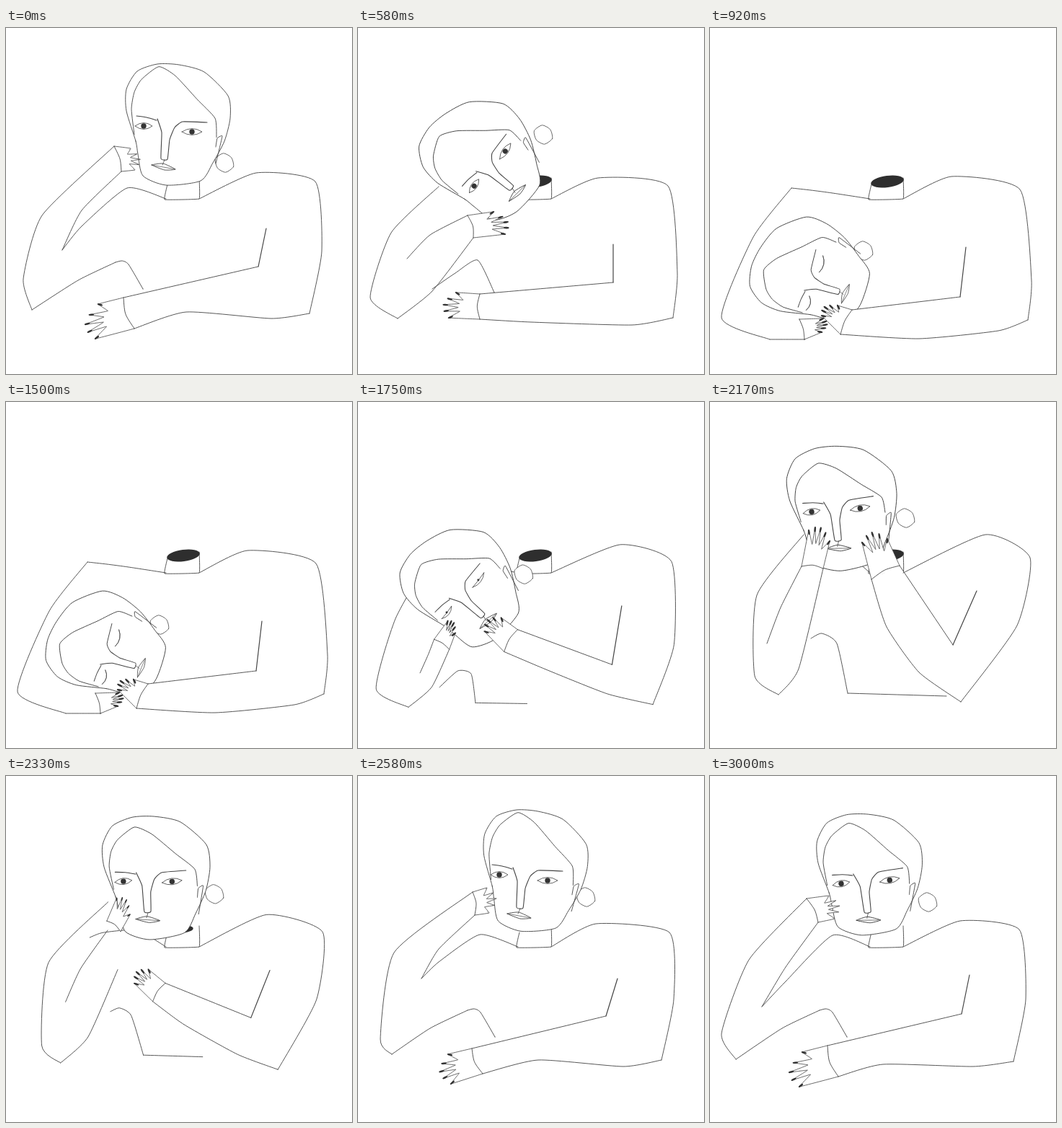
An HTML page with a canvas that plays this animation: 480x480 px, repeating every 3.08 s.

```html
<!DOCTYPE html>
<html lang="en">
<head>
<meta charset="utf-8">
<title>Resting on the elbows</title>
<style>
html, body { margin: 0; height: 100%; overflow: hidden; background: #fff; }
canvas { display: block; width: 100vw; height: 100vh; }
</style>
</head>
<body>
<canvas id="stage" width="480" height="480"></canvas>
<script>
// skull and face: x, y, degrees, scale. look: eyes open, neck open, hairline drop.
// Limbs: a few joints as x, y pairs. Hands: both cuff ends, then first and last fingertip.
const upright = {
  skull: [240, 135, 0, 1], face: [222, 160, 0, 1], bun: [303, 187], look: [1, 0, 0.02],
  side: [347, 201, 429, 213, 438, 310, 421, 396],
  under: [368, 403, 250, 394], elbow: [350, 331, 361, 278],
  handR: [163, 374, 178, 417, 128, 383, 124, 431],
  outer: [150, 164, 50, 260, 24, 348, 36, 391],
  inner: [100, 350, 152, 325], crease: [160, 199, 105, 253, 78, 308],
  torso: [168, 222, 105, 275, 78, 308],
  handL: [150, 164, 160, 199, 173, 167, 179, 197],
  hill: [152, 325, 161, 323, 170, 328, 190, 362], base: [190, 362]
};
const drooping = {
  skull: [178, 181, -42, 1], face: [197, 208, -55, 0.96], bun: [257, 148], look: [1, 1, 0.2],
  side: [333, 208, 430, 219, 443, 340, 437, 402],
  under: [380, 412, 240, 408], elbow: [354, 353, 354, 300],
  handR: [169, 369, 169, 404, 136, 367, 126, 402],
  outer: [112, 220, 46, 284, 17, 374, 55, 403],
  inner: [103, 365, 160, 291], crease: [152, 260, 100, 287, 68, 320],
  torso: [165, 225, 145, 222, 140, 222],
  handL: [152, 260, 160, 291, 188, 255, 204, 286],
  hill: [103, 362, 135, 340, 166, 322, 189, 367], base: [189, 367]
};
const asleep = {
  skull: [143, 337, -66, 0.95], face: [161, 360, -78, 0.85], bun: [213, 309], look: [0, 1, 0.2],
  side: [335, 206, 430, 224, 446, 350, 441, 405],
  under: [400, 420, 290, 431], elbow: [347, 373, 355, 304],
  handR: [197, 391, 181, 425, 177, 385, 155, 399],
  outer: [113, 222, 60, 290, 16, 402, 83, 432],
  inner: [107, 432, 131, 432], crease: [124, 404, 124, 404, 124, 404],
  torso: [170, 229, 140, 225, 113, 222],
  handL: [124, 404, 131, 432, 157, 403, 155, 422],
  hill: [131, 432, 131, 432, 131, 432, 131, 432], base: [131, 432]
};
const rising = {
  skull: [156, 186, -20, 1.02], face: [156, 217, -31, 1], bun: [244, 180], look: [0.8, 1, 0.25],
  side: [388, 191, 439, 219, 432, 325, 382, 432],
  under: [300, 392, 240, 322], elbow: [357, 357, 375, 265],
  handR: [242, 252, 221, 280, 217, 227, 193, 250],
  outer: [92, 205, 45, 310, 33, 395, 59, 416],
  inner: [98, 365, 123, 268], crease: [90, 266, 75, 305, 54, 352],
  torso: [170, 225, 140, 215, 110, 208],
  handL: [90, 266, 123, 268, 97, 220, 118, 235],
  hill: [98, 365, 145, 323, 179, 331, 190, 405], base: [322, 407]
};
const cupped = {
  skull: [188, 147, -8, 1.03], face: [176, 170, -11, 1], bun: [271, 161], look: [1, 1, 0.22],
  side: [382, 184, 444, 216, 426, 310, 348, 416],
  under: [290, 375, 245, 312], elbow: [337, 337, 370, 262],
  handR: [263, 227, 224, 246, 246, 190, 211, 195],
  outer: [130, 184, 65, 268, 62, 380, 95, 406],
  inner: [123, 370, 157, 231], crease: [127, 228, 98, 285, 79, 335],
  torso: [190, 210, 150, 190, 135, 186],
  handL: [127, 228, 157, 231, 137, 178, 166, 193],
  hill: [140, 328, 155, 321, 176, 335, 191, 404], base: [328, 408]
};
const leaning = {
  ...upright,
  skull: [247, 133, 2, 1], face: [227, 161, 0, 1], bun: [316, 168],
  side: [330, 205, 432, 217, 438, 310, 421, 394], elbow: [344, 333, 360, 281],
  handR: [158, 378, 173, 413, 125, 386, 129, 427],
  outer: [159, 161, 50, 245, 31, 365, 47, 386],
  crease: [162, 193, 112, 240, 88, 281], torso: [169, 220, 112, 258, 88, 281],
  handL: [159, 161, 162, 193, 179, 155, 182, 190]
};
const settled = {
  ...upright,
  skull: [224, 137, -3, 1], face: [217, 167, -11, 1], bun: [302, 175], look: [1, 0, 0.12],
  under: [365, 403, 240, 400], elbow: [349, 330, 360, 276],
  outer: [134, 170, 54, 255, 16, 357, 36, 393],
  crease: [150, 203, 105, 265, 72, 320], torso: [170, 221, 105, 285, 72, 320],
  handL: [134, 170, 150, 203, 165, 166, 173, 198]
};

// [tick, pose, easing power on the way in: >1 speeds up, <0 slows down]
const keys = [
  [0, upright, 1], [4, upright, 1], [7, drooping, 1.4], [11, asleep, -1.3],
  [18, asleep, 1], [23, rising, 1.2], [26, cupped, 1], [31, leaning, 1],
  [36, settled, 1], [37, upright, 1]
];
const LOOP = 3080, RATE = 12 / 1000, INK = '#444';
const NECK = [222, 237], NAPE = [268, 237];

// Shapes of the head, around the middle of the skull and of the face.
const SKULL = pairs([-60, 22, -73, -20, -73, -50, -58, -75, -30, -85, 0, -84, 35, -74, 68, -41,
  71, -10, 63, 22, 47, 52, 30, 77, -18, 83, -50, 70, -57, 40]);
const HAIR = pairs([-62, 13, -66, -23, -62, -47, -52, -65, -28, -83, -5, -70, 25, -37, 50, -10, 52, 17]);
const EAR = pairs([51, 30, 53, 18, 60, 15, 51, 53]);
const NOSE = pairs([-12, -34, -6, -15, -7, 21, 2, 22, 5, -5, 12, -22, 23, -30, 57, -29]);
const BROW = pairs([-41, -38, -27, -36, -13, -32]);
const MOUTH = pairs([-20, 30, -4, 28, 13, 36, -2, 37]);
const LIP = pairs([-2, 23, -5, 30]);
const BUN = Array.from({ length: 6 }, (_, i) => {
  const a = i * Math.PI / 3 + 0.4, r = 13 + Math.sin(a * 2);
  return [r * Math.cos(a), r * Math.sin(a)];
});

const ctx = document.getElementById('stage').getContext('2d');
ctx.lineCap = ctx.lineJoin = 'round';

function pairs(flat) {
  return Array.from({ length: flat.length / 2 }, (_, i) => [flat[2 * i], flat[2 * i + 1]]);
}

const mix = (p, q, u) => p.map((v, i) => v + (q[i] - v) * u);

function poseAt(tick) {
  const i = Math.max(1, keys.findIndex(k => k[0] >= tick));
  const [t0, a] = keys[i - 1], [t1, b, power] = keys[i];
  const u = (tick - t0) / (t1 - t0);
  const e = power > 0 ? u ** power : 1 - (1 - u) ** -power;
  return Object.fromEntries(Object.keys(a).map(name => [name, mix(a[name], b[name], e)]));
}

// Spline through the points; k = 0 keeps corners sharp.
function trace(pts, k, closed) {
  const n = pts.length;
  const at = i => closed ? pts[(i + n) % n] : pts[Math.min(n - 1, Math.max(0, i))];
  ctx.beginPath();
  ctx.moveTo(...pts[0]);
  for (let i = 0; i < (closed ? n : n - 1); i++) {
    const [o, p, q, r] = [at(i - 1), at(i), at(i + 1), at(i + 2)];
    ctx.bezierCurveTo(p[0] + (q[0] - o[0]) * k, p[1] + (q[1] - o[1]) * k,
      q[0] - (r[0] - p[0]) * k, q[1] - (r[1] - p[1]) * k, ...q);
  }
  if (closed) ctx.closePath();
}

function stroke(w) {
  ctx.strokeStyle = INK;
  ctx.lineWidth = w;
  ctx.stroke();
}

function fill(color) {
  ctx.fillStyle = color;
  ctx.fill();
}

function line(pts, { k = 0.1, w = 0.9, closed = false, paper = false } = {}) {
  trace(pts, k, closed);
  if (paper) fill('#fff');
  stroke(w);
}

function blob(x, y, rx, ry, turn, color) {
  ctx.beginPath();
  ctx.ellipse(x, y, rx, ry, turn, 0, 2 * Math.PI);
  fill(color);
}

function within([x, y, deg, scale], paint) {
  ctx.save();
  ctx.translate(x, y);
  ctx.rotate(deg * Math.PI / 180);
  ctx.scale(scale, scale);
  paint();
  ctx.restore();
}

// Five fingers fan out between the two outer tips, with webs pulled back to the wrist.
function hand(joints, nail) {
  const [a, b, first, last] = pairs(joints);
  const wrist = mix(a, b, 0.5), middle = mix(first, last, 0.5);
  const span = Math.hypot(last[0] - first[0], last[1] - first[1]);
  const reach = Math.hypot(middle[0] - wrist[0], middle[1] - wrist[1]);
  const push = (p, d) => p.map((v, i) => v + (middle[i] - wrist[i]) / reach * d);
  const tips = [0, 1, 2, 3, 4].map(i => push(mix(first, last, i / 4), span * 0.34 * Math.sin(i * Math.PI / 4)));
  const webs = tips.slice(1).map((tip, i) => mix(mix(tips[i], tip, 0.5), wrist, 0.4));
  const edge = tips.flatMap((tip, i) => i < 4 ? [tip, webs[i]] : [tip]);
  line([a, ...edge, b], { k: 0.03, w: 0.8, paper: true });
  line([a, push(wrist, span * 0.1), b], { k: 0.15 });
  for (const [x, y] of tips) {
    const turn = Math.atan2(wrist[1] - y, wrist[0] - x);
    blob(x + 2.5 * Math.cos(turn), y + 2.5 * Math.sin(turn), 3.8 * nail, 1.3 * nail, turn, '#333');
  }
}

function eye(x, y, w, open) {
  ctx.beginPath();
  ctx.moveTo(x - w, y);
  ctx.quadraticCurveTo(x, y + 9 - 18 * open, x + w, y);
  ctx.quadraticCurveTo(x, y + 9, x - w, y);
  stroke(0.8);
  blob(x, y, 3.7 * open, 3.7 * open, 0, '#333');
}

function head(p) {
  const [open, , drop] = p.look;
  within([...p.bun, 0, 1], () => line(BUN, { k: 0.12, closed: true, w: 0.8, paper: true }));
  within(p.skull, () => {
    line(SKULL, { k: 0.12, closed: true, paper: true });
    line(HAIR.map(([x, y]) => [x, y * (1 - drop)]));
    line(EAR, { k: 0.06 });
  });
  within(p.face, () => {
    line(NOSE, { k: 0.07, w: 1.1 });
    line(BROW, { w: 1.1 });
    eye(-31, -24, 12, open);
    eye(36, -16, 14, open);
    line(MOUTH, { k: 0.08, closed: true });
    line([MOUTH[0], MOUTH[2]], { w: 0.7 });
    line(LIP, { w: 0.8 });
  });
}

function draw(p) {
  ctx.fillStyle = '#fff';
  ctx.fillRect(0, 0, 480, 480);
  const gap = p.look[1];
  const side = pairs(p.side), under = pairs(p.under), outer = pairs(p.outer), hill = pairs(p.hill);
  const [bend, pit] = pairs(p.elbow), [cuffTop, cuffLow] = pairs(p.handR);
  const elbowR = side[3], elbowL = outer[3];

  line([NECK, ...pairs(p.torso)]);
  line(outer);
  line([elbowL, ...pairs(p.inner)]);
  line(pairs(p.crease));
  line(hill);
  line([hill[3], p.base]);
  line([[224, 217], [220, 238], NAPE, [268, 208]], { k: 0.03 });
  blob(246, 213, 23 * gap, 8 * gap, -0.13, '#2e2e2e');
  head(p);

  trace([cuffTop, bend, elbowR, ...under, cuffLow], 0, true);
  fill('#fff');
  line([NAPE, ...side]);
  line([elbowR, ...under, cuffLow]);
  line([cuffTop, bend]);
  line([bend, pit], { w: 1.2 });
  hand(p.handL, 0.2 + 0.8 * gap);
  hand(p.handR, 1);
}

let shown = -1;
const start = performance.now();
function frame() {
  const t = (performance.now() - start) % LOOP;
  const tick = Math.min(36, Math.floor((t + 5) * RATE));
  if (tick !== shown) draw(poseAt(shown = tick));
  requestAnimationFrame(frame);
}
frame();
</script>
</body>
</html>
```
